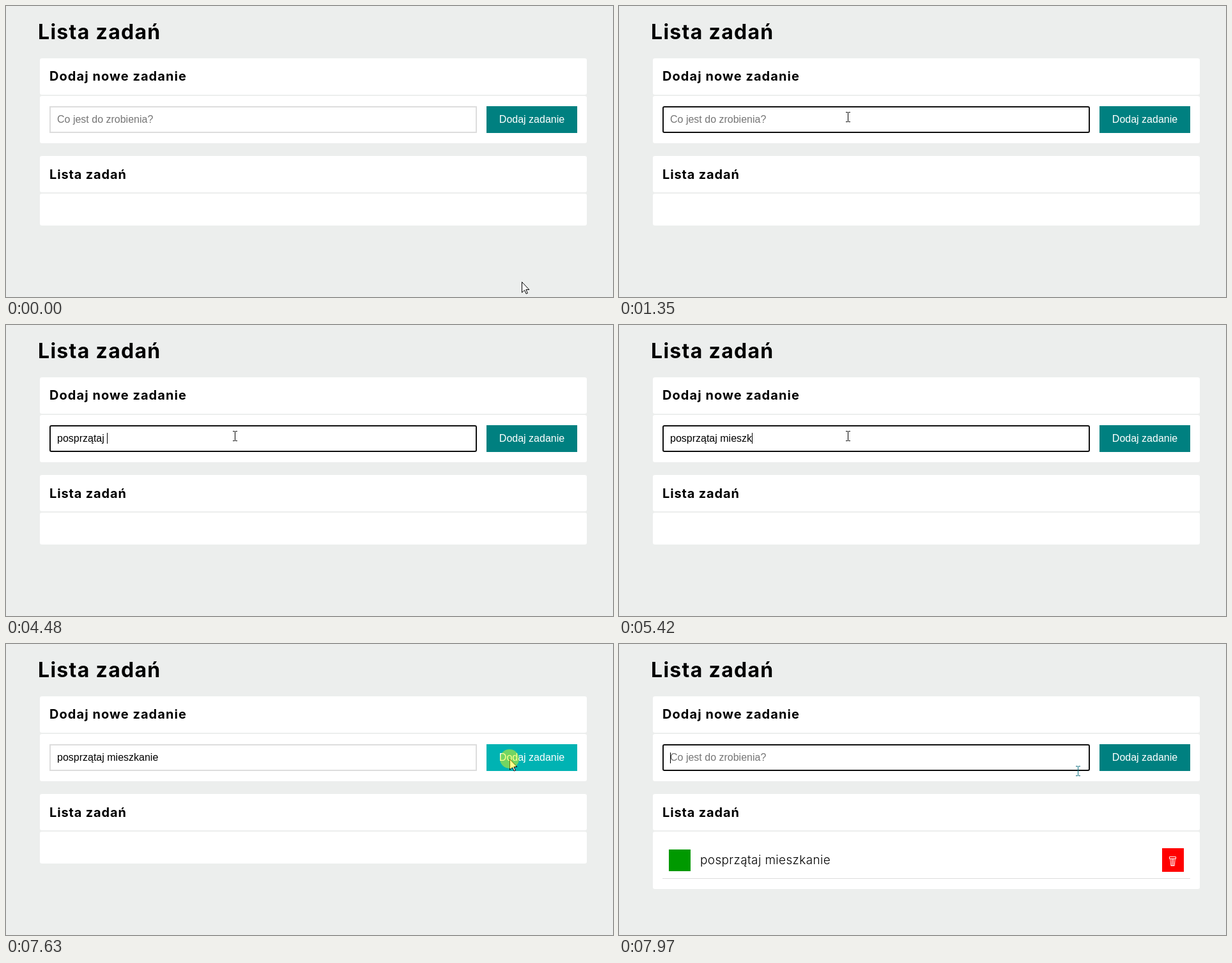
Recreate the animation shown at these times as an HTML page. Size 950 by 456 pixels, loop 8000 ms.

```html
<!DOCTYPE html>
<html lang="pl">
<head>
<meta charset="utf-8">
<title>Lista zadań</title>
<style>
  html, body { margin: 0; width: 100%; height: 100%; overflow: hidden; background: #eceeed; }
  svg { display: block; width: 100%; height: 100%; }
  text { white-space: pre; }
  .heading { font: 700 20px Inter, sans-serif; }
  .title { font: 700 32px Inter, sans-serif; letter-spacing: 1.3px; }
  .task { font: 300 19px Inter, sans-serif; letter-spacing: .35px; }
  .control { font: 16px "Liberation Sans", Arial, sans-serif; }
  .panel { fill: #fff; }
</style>
</head>
<body>
<svg viewBox="0 0 950 456">
  <rect width="950" height="456" fill="#eceeed"/>
  <text class="title" x="50" y="52">Lista zadań</text>

  <rect class="panel" x="53" y="82" width="856" height="57" rx="3"/>
  <rect class="panel" x="53" y="141" width="856" height="74" rx="3"/>
  <text class="heading" x="68" y="117" letter-spacing="1.05">Dodaj nowe zadanie</text>
  <rect id="field" x="69" y="158" width="667" height="40" fill="#fff" stroke-width="2"/>
  <text id="entry" class="control" x="80" y="183"></text>
  <rect id="caret" width="1" height="17"/>
  <rect id="button" x="752" y="157" width="142" height="42"/>
  <text class="control" x="823" y="183" text-anchor="middle" fill="#fff">Dodaj zadanie</text>

  <rect class="panel" x="53" y="235" width="856" height="57" rx="3"/>
  <rect id="list" class="panel" x="53" y="294" width="856" rx="3"/>
  <text class="heading" x="68" y="271" letter-spacing=".85">Lista zadań</text>
  <g id="item">
    <rect x="78" y="322" width="34" height="34" fill="#090"/>
    <text class="task" x="127" y="345">posprzątaj mieszkanie</text>
    <rect x="850" y="320" width="34" height="37" fill="red"/>
    <path d="M861.5 333.5h10v3h-10zM862.8 336.5l1 11h5.400l1-11M865.500 337v10M867.500 337v10" fill="none" stroke="#fff"/>
    <rect x="68" y="367" width="826" height="1" fill="#ddd"/>
  </g>

  <path id="arrow" d="M.5.5V17l4-3.700 2.700 5.700 2.200-1-2.600-5.500h5z" fill="#fff" stroke="#000"/>
  <path id="beam" d="M-3 -7.500H0M1 -7.500H4M-3 7.500H0M1 7.500H4M.5 -7V7" fill="none"/>
  <circle id="press" r="15" fill="#ff0" fill-opacity=".45"/>
</svg>
<script>
const LOOP = 8000, BLINK = 530;
const PHRASE = "posprzątaj mieszkanie";
const FOCUS = 820, BLUR = 7630, ADDED = 7700;
// One time per typed character; the extra last entry only restarts the blink.
const KEYS = [2080, 2280, 2380, 2480, 2680, 2880, 3360, 4150, 4210, 4410, 4480,
  4680, 4750, 4820, 5020, 5290, 5420, 5690, 5780, 5870, 5960, 6010];

const el = id => document.getElementById(id);
const [field, entry, caret, button, list, item, arrow, beam, press] =
  ["field", "entry", "caret", "button", "list", "item", "arrow", "beam", "press"].map(el);
const show = (node, visible) => node.setAttribute("display", visible ? "inline" : "none");
const place = (node, x, y) => node.setAttribute("transform", `translate(${x} ${y})`);
const mix = (a, b, u) => a + (b - a) * u;

// Progress in n even jumps, the first at start and the last at end.
function steps(t, start, end, n) {
  if (t < start) return 0;
  return Math.min(1, (Math.floor((t - start) / (end - start) * (n - 1) + 1e-6) + 1) / n);
}

function bezier(a, b, c, d, u) {
  const v = 1 - u;
  return v * v * v * a + 3 * v * v * u * b + 3 * v * u * u * c + u * u * u * d;
}

function pointer(t) {
  if (t < FOCUS) {
    const s = steps(t, 70, 680, 10), u = s * s * (3 - 2 * s);
    return [bezier(807, 640, 400, 340, u), bezier(432, 350, 290, 187, u)];
  }
  if (t < 6540) {
    const u = steps(t, 880, 1000, 3);
    return [mix(340, 358, u), mix(187, 174, u)];
  }
  if (t < BLUR) {
    const u = 1 - (1 - steps(t, 6610, 7230, 9)) ** 1.1;
    return [mix(358, 788, u), mix(174, 180, Math.min(1, u * 2.5))];
  }
  const u = steps(t, 7770, 7970, 3);
  return [mix(788, 718, u), mix(180, 199, u)];
}

const inside = (x, y, left, right) => x >= left && x < right && y >= 157 && y <= 199;

function draw(t) {
  const added = t >= ADDED;
  const focused = t >= FOCUS && t < BLUR || added;
  const pressed = KEYS.filter(k => k <= t);
  const typed = added ? "" : PHRASE.slice(0, pressed.length);

  field.setAttribute("stroke", focused ? "#101010" : "#ddd");
  field.setAttribute("rx", focused ? 2 : 0);
  entry.textContent = typed || "Co jest do zrobienia?";
  entry.setAttribute("fill", typed ? "#000" : "#757575");

  const since = added ? ADDED : pressed.at(-1) ?? FOCUS;
  show(caret, focused && Math.floor((t - since) / BLINK) % 2 === 0);
  caret.setAttribute("x", typed ? Math.floor(80 + entry.getComputedTextLength()) : 80);
  caret.setAttribute("y", typed ? 169 : 170);

  show(item, added);
  list.setAttribute("height", added ? 90 : 50);

  const [x, y] = pointer(t).map(Math.round);
  const overField = inside(x, y, 68, 737);
  button.setAttribute("fill", inside(x, y, 752, 894) ? "#00b3b3" : "#008080");
  show(arrow, !overField);
  show(beam, overField);
  beam.setAttribute("stroke", y > 190 ? "#0a7080" : "#000");
  place(arrow, x, y);
  place(beam, x, y);
  place(press, x, y);
  show(press, t >= FOCUS && t < 940 || t >= BLUR && t < 7770);
}

const begin = performance.now();
function tick() {
  draw((performance.now() - begin) % LOOP);
  requestAnimationFrame(tick);
}
tick();
</script>
</body>
</html>
```
